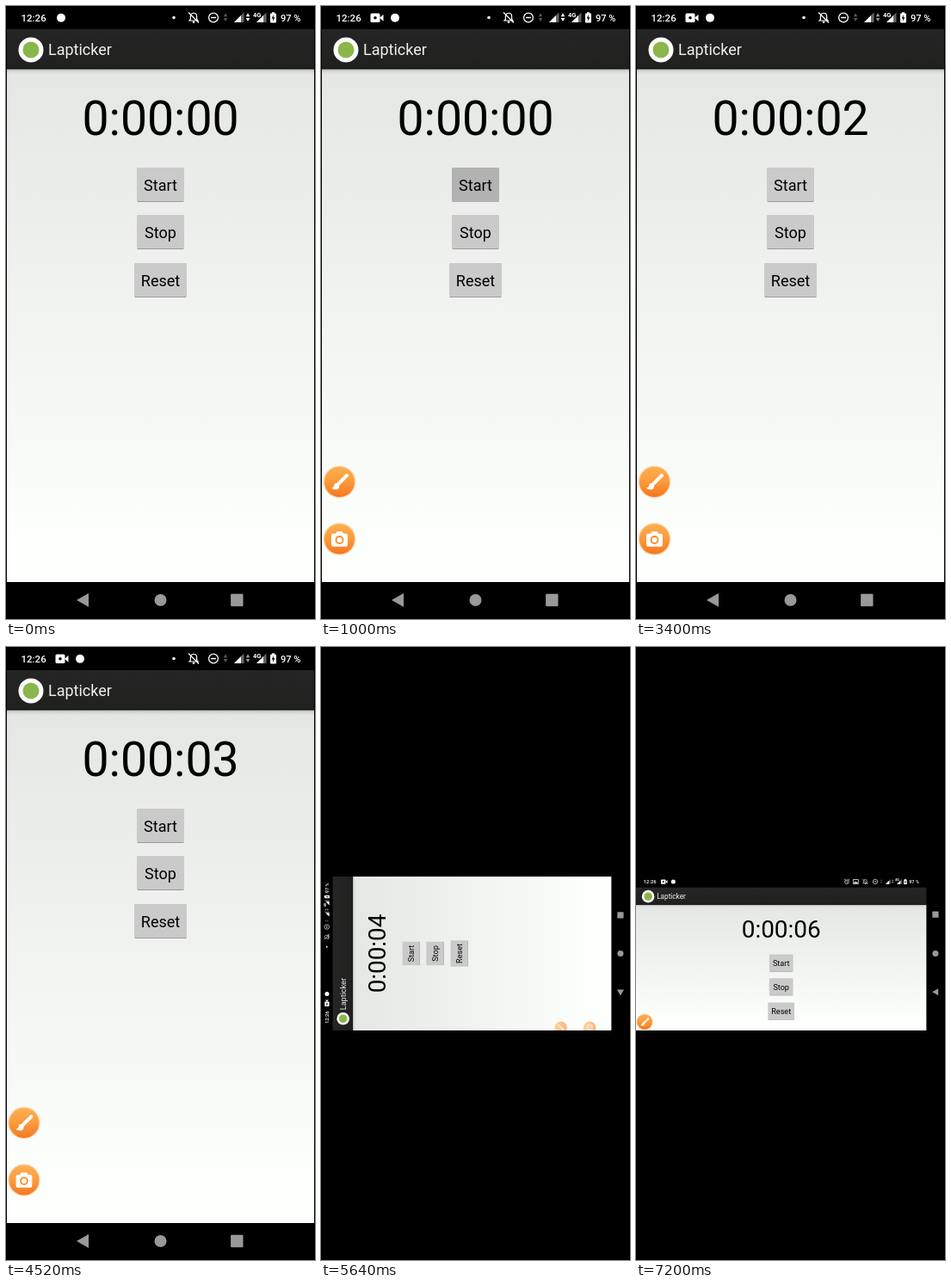
An HTML page with a canvas that plays this animation: 359 px wide and 713 px high, repeating every 8000 ms.

```html
<!DOCTYPE html>
<html lang="en">
<head>
<meta charset="utf-8">
<title>Lapticker</title>
<style>
html, body { margin: 0; width: 100%; height: 100%; overflow: hidden; background: #000; }
canvas { display: block; width: 359px; height: 713px; }
</style>
</head>
<body>
<canvas id="stage"></canvas>
<script>
const W = 359, H = 713, LOOP = 8000;
const SMALL = W / H;
const FONT = 'Roboto, "Noto Sans", sans-serif';
const TICKS = [2280, 3320, 4360, 5440, 6360, 7200];
const NAV = 43, STATUS = 27;

const canvas = document.getElementById('stage');
const dpr = window.devicePixelRatio || 1;
canvas.width = W * dpr;
canvas.height = H * dpr;
const ctx = canvas.getContext('2d');

const clamp = v => Math.min(1, Math.max(0, v));
const ease = v => v * v * (3 - 2 * v);
const span = (t, a, b) => ease(clamp((t - a) / (b - a)));
const mix = (a, b, p) => a + (b - a) * p;

function rect(x, y, w, h, color) {
  ctx.fillStyle = color;
  ctx.fillRect(x, y, w, h);
}

function disc(x, y, r, color) {
  ctx.fillStyle = color;
  ctx.beginPath();
  ctx.arc(x, y, r, 0, Math.PI * 2);
  ctx.fill();
}

function ring(x, y, r, width, color) {
  ctx.strokeStyle = color;
  ctx.lineWidth = width;
  ctx.beginPath();
  ctx.arc(x, y, r, 0, Math.PI * 2);
  ctx.stroke();
}

function trace(pts) {
  ctx.beginPath();
  for (let i = 0; i < pts.length; i += 2) ctx.lineTo(pts[i], pts[i + 1]);
}

function poly(color, ...pts) {
  ctx.fillStyle = color;
  trace(pts);
  ctx.fill();
}

function line(color, width, ...pts) {
  ctx.strokeStyle = color;
  ctx.lineWidth = width;
  trace(pts);
  ctx.stroke();
}

function round(x, y, w, h, r, color) {
  ctx.fillStyle = color;
  ctx.beginPath();
  ctx.roundRect(x, y, w, h, r);
  ctx.fill();
}

function text(str, x, y, size, color, align = 'left', weight = 400) {
  ctx.font = `${weight} ${size}px ${FONT}`;
  ctx.textAlign = align;
  ctx.fillStyle = color;
  ctx.fillText(str, x, y);
}

function gradient(y0, y1, ...colors) {
  const g = ctx.createLinearGradient(0, y0, 0, y1);
  colors.forEach((c, i) => g.addColorStop(i / (colors.length - 1), c));
  return g;
}

function placed(x, y, scale, angle, draw) {
  ctx.save();
  ctx.translate(x, y);
  ctx.rotate(angle);
  ctx.scale(scale, scale);
  draw();
  ctx.restore();
}

function faded(alpha, draw) {
  ctx.save();
  ctx.globalAlpha = alpha;
  draw();
  ctx.restore();
}

function clipped(x, y, w, h, draw) {
  ctx.save();
  ctx.beginPath();
  ctx.rect(x, y, w, h);
  ctx.clip();
  draw();
  ctx.restore();
}

function bellOff(x) {
  ctx.strokeStyle = '#fff';
  ctx.lineWidth = 1.2;
  ctx.beginPath();
  ctx.moveTo(x - 5, 17);
  ctx.lineTo(x - 3.6, 15.5);
  ctx.lineTo(x - 3.6, 12);
  ctx.bezierCurveTo(x - 3.6, 7, x + 3.6, 7, x + 3.6, 12);
  ctx.lineTo(x + 3.6, 15.5);
  ctx.lineTo(x + 5, 17);
  ctx.closePath();
  ctx.stroke();
  disc(x, 18.7, 1.3, '#fff');
  line('#fff', 1.3, x - 6, 7.5, x + 6, 19.5);
}

function dataArrows(x, color) {
  poly(color, x - 2.3, 12.3, x, 8.3, x + 2.3, 12.3);
  poly(color, x - 2.3, 14, x, 18, x + 2.3, 14);
}

function signal(x) {
  poly('#666', x, 19, x + 11.5, 19, x + 11.5, 7.5);
  poly('#fff', x, 19, x + 8, 19, x + 8, 11);
}

function statusIcons(t, wide) {
  if (wide) {
    ring(175.5, 14, 4.6, 1.4, '#fff');
    line('#fff', 1.2, 175.5, 11, 175.5, 14.5, 177.5, 15.5);
    line('#fff', 1.5, 169.5, 10, 172.5, 7.5);
    line('#fff', 1.5, 178.5, 7.5, 181.5, 10);
    ctx.lineWidth = 1.4;
    ctx.strokeRect(190, 9, 12, 9.5);
    poly('#fff', 191, 17, 194.5, 12.5, 197, 15, 199, 13, 201, 17);
  } else {
    disc(195, 13.5, 1.8, '#fff');
  }
  bellOff(218);
  ring(241, 13.5, 5.4, 1.3, '#fff');
  line('#fff', 1.5, 238, 13.5, 244, 13.5);
  dataArrows(255, '#555');
  signal(265);
  dataArrows(281, t < 2560 ? '#fff' : '#999');
  signal(291);
  rect(286.5, 5.5, 10.5, 8, '#000');
  text('4G', 287, 12.5, 7.5, '#fff', 'left', 700);
  round(307, 8.5, 7, 11, 1, '#fff');
  rect(309, 7.3, 3, 2, '#fff');
  poly('#000', 311, 10, 308.6, 14.5, 310.3, 14.5, 309.8, 18, 312.4, 13.3, 310.7, 13.3);
  text('97 %', 319, 17.8, 11, '#fff', 'left', 500);
}

function recorderIcon() {
  round(57.5, 8.5, 11, 10.5, 1.5, '#fff');
  poly('#fff', 68, 13.7, 72.5, 9.7, 72.5, 17.7);
  disc(63, 13.7, 1.8, '#000');
}

function statusBar(t, width, wide) {
  rect(0, 0, width, STATUS, '#000');
  text('12:26', 17.5, 18, 11.5, '#fff', 'left', 500);
  const shown = span(t, 20, 240);
  faded(shown, recorderIcon);
  disc(mix(64, 86, shown), 13.8, 5, '#fff');
  placed(wide ? 311 : 0, 0, 1, 0, () => statusIcons(t, wide));
}

function button(label, cx, y, w, pressed) {
  const x = cx - w / 2;
  round(x, y, w, 40, 1, pressed ? '#b2b2b2' : '#cacaca');
  if (!pressed) rect(x + 1, y + 39, w - 2, 1, '#9b9b9b');
  text(label, cx, y + 26.5, 18, '#000', 'center');
}

function app(t, width, bottom, bar, seconds) {
  const top = STATUS + bar, shift = bar - 46;
  const fadeEnd = mix(top, bottom, 0.92);
  rect(0, top, width, bottom - top, gradient(top, fadeEnd, '#e5e7e4', '#fdfffc'));
  rect(0, top, width, 7, gradient(top, top + 7, 'rgba(0,0,0,.22)', 'rgba(0,0,0,.05)', 'rgba(0,0,0,0)'));
  rect(0, STATUS, width, bar, gradient(STATUS, top, '#242524', '#20211f'));
  rect(0, top - 1, width, 1.5, '#111');
  const iconX = shift ? 28 : 29;
  disc(iconX, 51 + shift / 2, 14.5, '#fff');
  disc(iconX, 51 + shift / 2, 9.5, '#8ab64c');
  text('Lapticker', iconX + 20, 57 + shift / 2, shift ? 16.3 : 18, '#f0f0f0');
  const cx = shift ? width / 2 : 179.5;
  text('0:00:0' + seconds, cx, 149.5 + shift, 55.3, '#000', 'center');
  button('Start', cx, 188 + shift, 55, t >= 940 && t < 1240);
  button('Stop', cx, 243 + shift, 55);
  button('Reset', cx, 299 + shift, 61);
}

function brushIcon() {
  line('#fff', 4, 8.5, -7.5, -1, 2);
  ctx.fillStyle = '#fff';
  ctx.beginPath();
  ctx.moveTo(-9.5, 7);
  ctx.bezierCurveTo(-5, 7, -7.5, 1.5, -3.5, 1.5);
  ctx.bezierCurveTo(1, 2.5, 0.5, 9, -4, 9);
  ctx.bezierCurveTo(-6.5, 9, -8.5, 8.3, -9.5, 7);
  ctx.fill();
}

function cameraIcon() {
  round(-9.5, -6.3, 19, 15, 2, '#fff');
  poly('#fff', -5, -6, -3, -8.7, 3, -8.7, 5, -6);
  ring(0, 1, 4, 1.8, '#f58a2c');
}

function floater(x, y, scale, alpha, icon) {
  faded(alpha, () => placed(x, y, scale, 0, () => {
    disc(0, 0, 19, '#fbdcbc');
    disc(0, 0, 17.6, gradient(-18, 18, '#fdb052', '#fb9a3a', '#f4761f'));
    ctx.lineCap = 'round';
    icon();
  }));
}

// Back, home and recents along a bar at the bottom or, turned, at the right.
function navIcons(along, turned) {
  const gray = '#999';
  const at = (pos, draw) => placed(turned ? 691 : pos, turned ? pos : 691, 1, 0, draw);
  at(along[0], () => poly(gray, -7.5, 0, 6.5, -8, 6.5, 8));
  at(along[1], () => disc(0, 0, 7, gray));
  at(along[2], () => round(-7.2, -7.2, 14.4, 14.4, 1, gray));
}

function portrait(t, seconds, edges) {
  rect(0, 0, W, H, '#000');
  statusBar(t, W, false);
  app(t, W, H - NAV, 46, seconds);
  if (t >= 480) {
    const enter = span(t, 480, 920), dock = span(t, 4440, 5120);
    const x = mix(mix(-20, 21.5, enter), 8, dock);
    const scale = mix(1, 0.8, dock), alpha = mix(1, 0.47, dock);
    floater(x, 553.5, scale, alpha, brushIcon);
    floater(x, 620, scale, alpha, cameraIcon);
  }
  if (edges) {
    rect(0, 0, 1, H, '#000');
    rect(W - 1, 0, 1, H, '#000');
  }
  navIcons([89.5, 179.5, 268.3], false);
}

function landscape(t, seconds) {
  rect(0, 0, H, W, '#000');
  statusBar(t, H - NAV, true);
  app(t, H - NAV, W, 39.5, seconds);
  floater(20, 337.5, 1, 1, brushIcon);
  navIcons([268.3, 179.5, 89.5], true);
}

// The screen turns in a few coarse jumps.
function turnAt(t) {
  if (t < 6360) return 0;
  if (t < 6520) return 0.25;
  if (t < 6600) return 0.75;
  return t < 6720 ? 0.94 : 1;
}

function letterboxed(t, seconds) {
  const turn = turnAt(t), upright = turn < 0.5;
  const [w, h] = upright ? [W, H] : [H, W];
  clipped(0, 267, W, 179, () => {
    placed(W / 2, H / 2, SMALL, (turn - 1) * Math.PI / 2, () => {
      ctx.translate(-w / 2, -h / 2);
      clipped(0, 0, w, h, () => {
        if (upright) portrait(t, seconds, false);
        else landscape(t, seconds);
      });
    });
  });
}

function render(t) {
  ctx.setTransform(dpr, 0, 0, dpr, 0, 0);
  rect(0, 0, W, H, '#000');
  const seconds = TICKS.filter(tick => t >= tick).length;
  if (t < 5640) portrait(t, seconds, true);
  else letterboxed(t, seconds);
}

function frame() {
  render(performance.now() % LOOP);
  requestAnimationFrame(frame);
}
frame();
</script>
</body>
</html>
```
